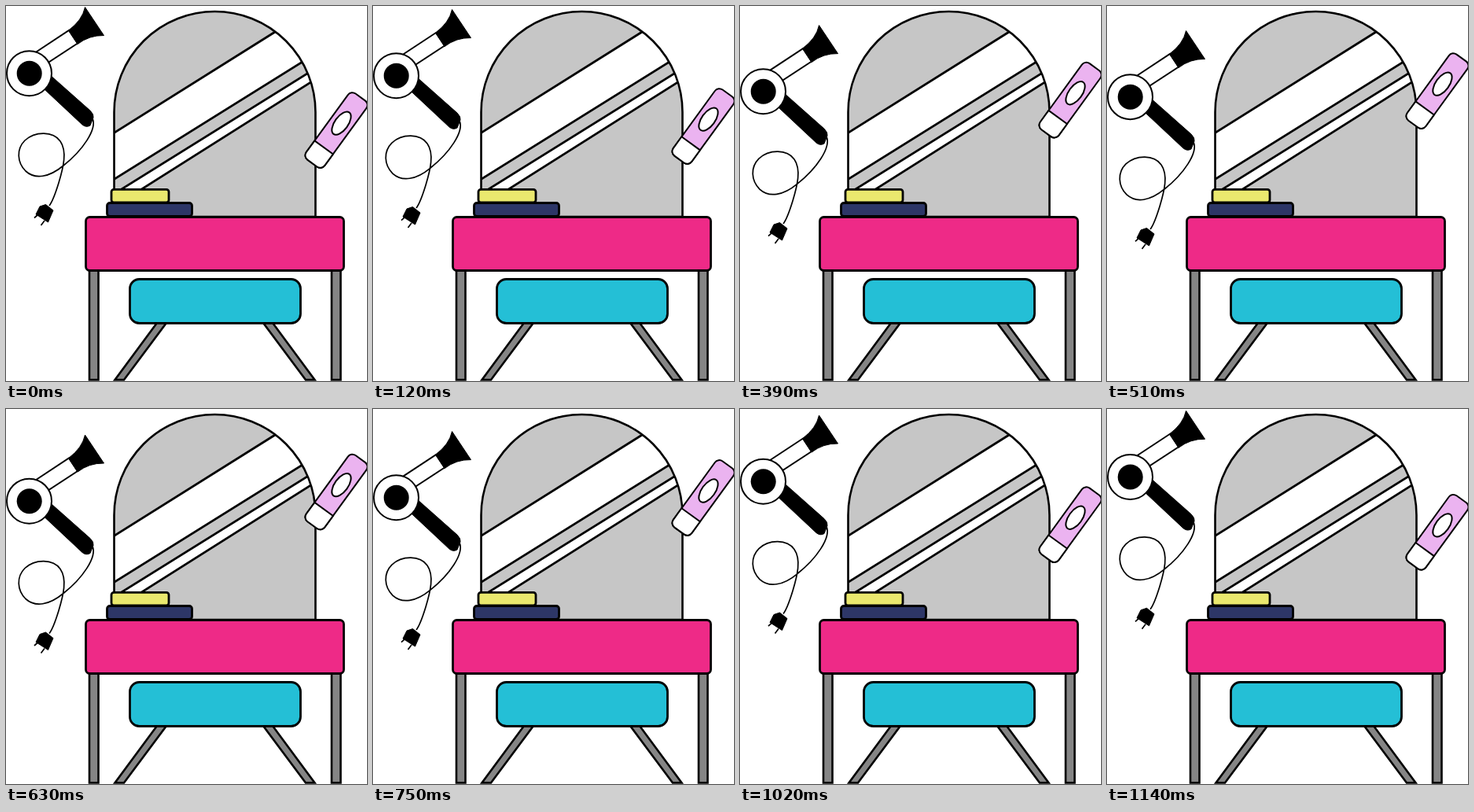
Recreate the animation shown at these times as an HTML page. Size 459 px wide and 477 px high, loop 1.17 s.

```html
<!DOCTYPE html>
<html lang="en">
<head>
<meta charset="utf-8">
<title>Dressing table</title>
<style>
  html, body { margin: 0; width: 100%; height: 100%; overflow: hidden; background: #fff; }
  svg { display: block; width: 459px; height: 477px; }
</style>
</head>
<body>
<svg viewBox="0 0 459 477" fill="none" stroke="#000" stroke-width="2.8">
  <defs>
    <path id="glass" d="M137.5 268V135a128 128 0 0 1 256 0V268Z"/>
    <clipPath id="inside"><use href="#glass"/></clipPath>
  </defs>

  <!-- mirror -->
  <use href="#glass" fill="#c6c6c6" stroke="none"/>
  <g clip-path="url(#inside)" fill="#fff">
    <path d="M128 167.3L352 26.7L397 58.5L128 226.2Z"/>
    <path d="M129 244L404 73V86.5L129 260.5Z"/>
  </g>
  <use href="#glass" stroke-width="2.6"/>

  <!-- books -->
  <rect x="134" y="233.3" width="73" height="16.5" rx="3" fill="#eae86e"/>
  <rect x="128.5" y="250.5" width="108" height="17" rx="3.5" fill="#2d3667"/>

  <!-- table and stool -->
  <g fill="#858585" stroke-width="2.6">
    <path d="M106 336h11.5v139.5h-11.5ZM414 336h11.5v139.5h-11.5Z"/>
    <path d="M192 403h12L150 475.5h-11.500ZM327 403h12L392.500 475.5h-11.500Z"/>
  </g>
  <rect x="101.5" y="268.5" width="328" height="68" rx="5" fill="#ee2a87"/>
  <rect x="157.5" y="347.5" width="217" height="56" rx="12" fill="#24bfd6"/>

  <!-- hair dryer -->
  <g id="dryer" stroke-width="2">
    <path d="M110 143C116 157 97 184 73 203C55 218 37 221 25 210C14 199 13 182 24 171C37 159 60 159 69 172C78 185 73 205 67 225C63 238 59 249 55 254" stroke-width="1.7"/>
    <path d="M43 255L50.5 252.5L60 260L53.500 275L38 265Z" fill="#000" stroke-width="1"/>
    <path d="M41 265l-5 4.5M49 273l-4.5 6" stroke-width="1.7"/>
    <path d="M54 86L107 133Q112 138 111 142L107 152Q102 155 97 151L50 107Z" fill="#000" stroke-width="1"/>
    <path d="M36 60L80 31L91 47.5L52 73Z" fill="#fff"/>
    <path d="M79.500 31Q97 18 100.500 1.500L124.500 37.500Q106 37 91 48.500Z" fill="#000" stroke-width="1"/>
    <circle cx="29.500" cy="85.700" r="28.500" fill="#fff"/>
    <circle cx="29.700" cy="85.700" r="16" fill="#000" stroke="none"/>
  </g>

  <!-- bottle -->
  <g id="bottle" stroke-width="2">
    <g transform="translate(420 158) rotate(36)">
      <rect x="-14.500" y="-52" width="29" height="104" rx="7" fill="#ebb3f0"/>
      <path d="M-14.500 27h29v18a7 7 0 0 1-7 7h-15a7 7 0 0 1-7-7Z" fill="#fff"/>
      <ellipse cy="-11" rx="8.500" ry="17" fill="#fff"/>
    </g>
  </g>
</svg>
<script>
  const LOOP = 1170, STEP = 30, PERIOD = 1200;
  const floaters = [['dryer', 31.7], ['bottle', -52.8]]
    .map(([id, travel]) => [document.getElementById(id), travel]);

  function draw() {
    const t = Math.floor(performance.now() % LOOP / STEP) * STEP;
    const sway = (1 - Math.cos(2 * Math.PI * t / PERIOD)) / 2;
    for (const [el, travel] of floaters) {
      el.setAttribute('transform', `translate(0 ${(travel * sway).toFixed(2)})`);
    }
    requestAnimationFrame(draw);
  }
  draw();
</script>
</body>
</html>
```
